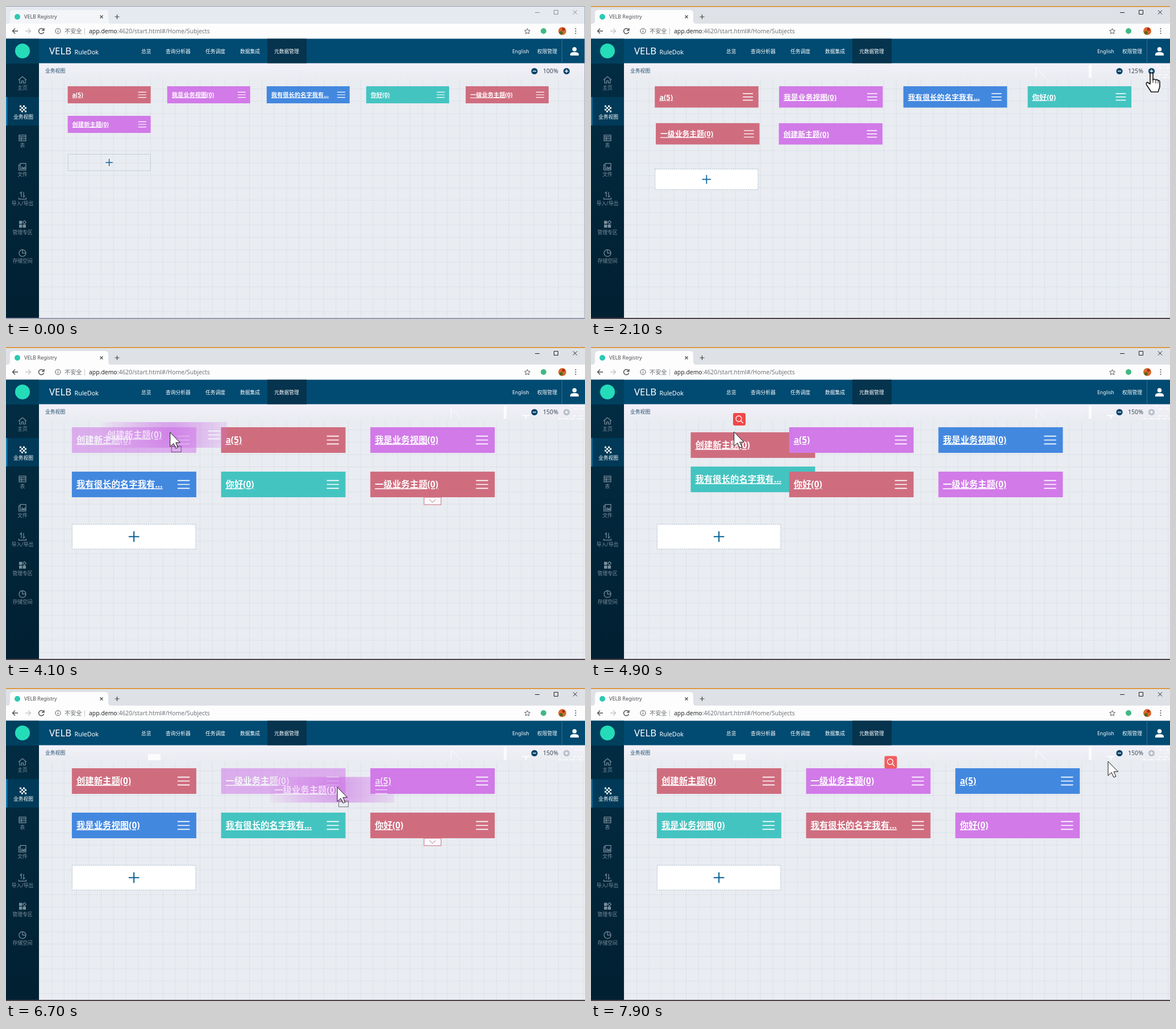
An HTML page that plays this animation: 1019 by 550 pixels, repeating every 8000 ms.

```html
<!DOCTYPE html>
<html lang="zh">
<head>
<meta charset="utf-8">
<style>
html, body { margin: 0; width: 100%; height: 100%; overflow: hidden; background: #e9ecf1 }
svg { display: block; width: 1019px; height: 550px; font-family: "Noto Sans", "Noto Sans CJK SC", sans-serif }
text { white-space: pre }
.title { font-weight: 700; fill: #fff; text-decoration: underline }
</style>
</head>
<body>
<svg id="stage" viewBox="0 0 1019 550"></svg>
<script>
const LOOP = 8000, FLIP = 500;
const NAMES = ['a(5)', '我是业务视图(0)', '我有很长的名字我有...', '你好(0)', '一级业务主题(0)', '创建新主题(0)'];
const COLORS = ['#cf6d7f', '#d17ae8', '#4388df', '#44c4c1', '#cf6d7f', '#d17ae8'];

// start time, zoom, card order by slot
const SCENES = [
  [0, 1, [0, 1, 2, 3, 4, 5]],
  [1635, 1.25, [0, 1, 2, 3, 4, 5]],
  [2605, 1.5, [0, 1, 2, 3, 4, 5]],
  [4600, 1.5, [5, 0, 1, 2, 3, 4]],
  [7100, 1.5, [5, 4, 0, 1, 2, 3]]
];
// start, reorder, release and drop times, dragged card, order while dragging
const DRAGS = [
  [3800, 3950, 4300, 4600, 5, SCENES[3][2]],
  [6400, 6650, 6900, 7100, 4, SCENES[4][2]]
];
// appearance time, left, top
const BADGES = [[4600, 250, 116], [7100, 516.5, 119.5]];

const ARROW = 0, HAND = 1, BEAM = 2, DRAG = 3;
const PATH = [
  [250, 1000, 172, ARROW], [600, 783, 107, ARROW], [1000, 960, 84, ARROW],
  [1300, 986, 117, HAND], [2700, 986, 117, HAND], [3000, 969, 118, BEAM],
  [3080, 958, 124, ARROW], [3500, 768, 230, ARROW], [3600, 756, 237, ARROW],
  [3800, 760, 237, DRAG], [3950, 480, 172, DRAG], [4100, 289, 150, DRAG],
  [4300, 251, 149, DRAG], [4600, 251, 149, HAND], [4900, 251, 149, ARROW],
  [5400, 600, 245, ARROW], [6000, 773, 191, ARROW], [6150, 788, 215, ARROW],
  [6300, 760, 237, ARROW], [6400, 760, 237, DRAG], [6650, 600, 180, DRAG],
  [6900, 517, 152, DRAG], [7100, 517, 152, HAND], [7300, 517, 152, ARROW],
  [7600, 760, 235, ARROW], [7900, 910, 129, ARROW], [8000, 910, 129, ARROW]
];

const mix = (a, b, p) => a + (b - a) * p;
const rect = (x, y, w, h, fill, extra = '') =>
  `<rect x="${x}" y="${y}" width="${w}" height="${h}" fill="${fill}" ${extra}/>`;
const circle = (x, y, r, fill, extra = '') =>
  `<circle cx="${x}" cy="${y}" r="${r}" fill="${fill}" ${extra}/>`;
const text = (x, y, size, fill, s, extra = '') =>
  `<text x="${x}" y="${y}" font-size="${size}" fill="${fill}" ${extra}>${s}</text>`;
const line = (d, color, width = 1, extra = '') =>
  `<path d="${d}" fill="none" stroke="${color}" stroke-width="${width}" ${extra}/>`;
const at = (x, y, body, extra = '') => `<g transform="translate(${x} ${y})" ${extra}>${body}</g>`;

// CSS "ease" curve
function ease(p) {
  if (p <= 0) return 0;
  if (p >= 1) return 1;
  let lo = 0, hi = 1, u;
  for (let i = 0; i < 20; i++) {
    u = (lo + hi) / 2;
    const x = .75 * u * (1 - u) ** 2 + .75 * u * u * (1 - u) + u ** 3;
    if (x < p) lo = u; else hi = u;
  }
  return .3 * u * (1 - u) ** 2 + 3 * u * u * (1 - u) + u ** 3;
}

function slotPos(slot, zoom) {
  const cols = zoom == 1 ? 5 : zoom == 1.25 ? 4 : 3;
  return [94 + 14.6 * zoom + slot % cols * 175.1 * zoom, 141 + Math.floor(slot / cols) * 52 * zoom];
}

function pointer(t) {
  const i = PATH.findLastIndex(k => k[0] <= t);
  if (i < 0) return null;
  const a = PATH[i], b = PATH[i + 1] || a;
  const p = b === a ? 0 : (t - a[0]) / (b[0] - a[0]);
  return { x: mix(a[1], b[1], p), y: mix(a[2], b[2], p), kind: a[3] };
}

function drawPointer({ x, y, kind }) {
  const ink = 'fill="#fff" stroke="#111" stroke-linejoin="round"';
  const arrow = `<path d="M0 0V25L6 19.5L10 28L14 26.3L10 18H17.5Z" ${ink}/>`;
  const shapes = [
    arrow,
    `<path d="M-2 2Q0-1 3 2V13Q5 10 8 13Q10 11 12 14Q15 13 15 17V25L12 34H0L-8 22Q-10 18-7 17L-2 20Z" ${ink} stroke-width="1.6"/>`
      + line('M3 12V18M8 13V19M12 14V19', '#111'),
    line('M-6-11H-2L0-9L2-11H6M0-9V9M-6 11H-2L0 9L2 11H6', '#111', 2.2),
    arrow + rect(2.5, 24.5, 17, 10, 'none', 'stroke="#333" stroke-dasharray="2 1"')
  ];
  return at(x, y, shapes[kind]);
}

function cardBody(name, zoom, fill) {
  const w = 146 * zoom, h = 30 * zoom, mid = h / 2, gap = 4.6 * zoom;
  const bars = [-gap, 0, gap].map(d => `M${w - 22 * zoom} ${mid + d}h${14.2 * zoom}`).join('');
  return rect(0, 0, w, h, fill)
    + text(8, mid + 3.9 * zoom, 10.27 * zoom, '#fff', name, 'class="title"')
    + line(bars, '#fff', 1.1 * zoom);
}

const handle = color => rect(94.5, 45, 30, 13, '#f8fafc', `stroke="${color}"`)
  + line('M104 49l5.5 5l5.5-5', color);

function drawCards(t, cursor) {
  const n = SCENES.findLastIndex(s => s[0] <= t);
  const [start, zoom, order] = SCENES[n];
  const drag = DRAGS.find(d => t >= d[0] && t < d[3]);
  const shown = drag && t >= drag[1] ? drag[5] : order;
  const p = ease((t - start) / FLIP);
  let out = '';

  shown.forEach((id, slot) => {
    let [x, y] = slotPos(slot, zoom);
    if (n && p < 1) {
      const [, oldZoom, oldOrder] = SCENES[n - 1];
      const [ox, oy] = slotPos(oldOrder.indexOf(id), oldZoom);
      x = mix(ox, x, p);
      y = mix(oy, y, p);
    }
    const color = COLORS[order.indexOf(id)];
    const over = cursor && cursor.x > x && cursor.x < x + 219 && cursor.y > y && cursor.y < y + 58;
    const open = zoom == 1.5 && (drag ? slot == 5 : over);
    const held = drag && drag[4] == id;
    out += at(x, y, cardBody(NAMES[id], zoom, color), held ? 'opacity=".55"' : '');
    if (open) out += at(x, y, handle(color));
  });

  const bx = 94 + 14.6 * zoom + .5, by = Math.round(158 + 102 * zoom) + .5;
  const w = 145 * zoom, h = 29 * zoom, arm = 6.2 * zoom;
  out += rect(bx, by, w, h, zoom > 1 ? '#fff' : 'none', 'stroke="#a9bccb" stroke-dasharray="2.2 1.5"')
    + line(`M${bx + w / 2 - arm} ${by + h / 2}h${2 * arm}m${-arm} ${-arm}v${2 * arm}`, '#0b6296', 1.4 * zoom);

  if (drag && t < drag[2]) {
    out += at(cursor.x - 119, cursor.y - 18, cardBody(NAMES[drag[4]], zoom, 'url(#fade)'), 'opacity=".6"');
  }
  return out;
}

function drawZoom(zoom) {
  const off = zoom == 1.5;
  return circle(930, 114.5, 5.6, '#07436a') + line('M927 114.5h6', '#fff', 1.4)
    + text(945, 118.3, 10.6, '#3c4b58', zoom * 100 + '%')
    + circle(986.5, 114.5, 5.6, off ? '#b6bdc6' : '#07436a') + line('M983.5 114.5h6m-3-3v6', '#fff', 1.4);
}

function drawBadges(t) {
  return BADGES.map(([t0, x, y]) => {
    const age = t - t0;
    if (age < 0 || age > 1650) return '';
    const alpha = 1 - Math.max(0, age - 200) * .00027;
    return at(x, y, rect(0, 0, 22, 22, '#f04444', 'rx="3"')
      + circle(10, 10, 5, 'none', 'stroke="#fff" stroke-width="1.3"')
      + line('M13.7 13.7l4 4', '#fff', 1.3), `opacity="${alpha}"`);
  }).join('');
}

// pale traces left on the toolbar strip
function drawTraces(t) {
  let out = '';
  if (t > 1100) {
    out += line('M783.5 108V126M783.5 108L800 126', '#fff') + rect(876, 103, 5, 23, '#fff', 'opacity=".8"')
      + line('M994 104h24M972 126h46M1000 109h18M998 121h20', '#fff', 2, 'stroke-dasharray="5 3 2 2" opacity=".75"');
  }
  if (t > 3100) out += rect(908, 119.5, 13, 2, '#fff') + rect(914, 121, 2, 5, '#fff');
  if (t > 6250) out += rect(250, 116, 22, 11, '#fff', 'opacity=".85"');
  return out;
}

function drawChrome(active) {
  const ink = active ? '#222' : '#858a92';
  return rect(0, 0, 1019, 31, active ? '#dee1e6' : '#e5e9f0')
    + rect(0, 0, 1019, active ? 1.6 : 1, active ? '#dc8a24' : '#8e96a8')
    + `<path d="M2 31Q7 31 7 26V13Q7 7 13 7H174Q180 7 180 13V26Q180 31 185 31Z" fill="${active ? '#fdfdfd' : '#f3f5f8'}"/>`
    + circle(20, 19, 5, '#2cc9b4')
    + text(32, 22.4, 9, '#4a4d52', 'VELB Registry')
    + line('M165.5 16.5l5 5m0-5l-5 5M191.5 19h8m-4-4v8', '#444', 1.2)
    + line('M931 11.5h8M964.5 7.5h7v7h-7zM998 7.5l7 7m0-7l-7 7', ink)
    + rect(0, 548, 1019, 2, active ? '#4c4049' : '#969bb2')
    + (active ? '' : rect(1018, 0, 1, 550, '#a3a9bb'));
}

function sidebar() {
  const items = [
    ['主页', 'M22 130l7-6l7 6M24 129v6.5h3.5v-4h3v4H34V129'],
    ['业务视图', ''],
    ['表', 'M23 125.5h12v10H23zM23 128.5h12M23 132h12M27 128.5v7'],
    ['文件', 'M25 124.5h10v9H25zM25 127h-2.5v9H35v-3M27 131h2l1 1.5h2l1-1.5h2'],
    ['导入/导出', 'M27 133v-9l-2.5 2.5M31 124v9l2.5-2.5M22.5 134v2.5h13V134'],
    ['管理专区', ''],
    ['存储空间', 'M35 130a6 6 0 1 1-6-6v6zM29 124a6 6 0 0 1 6 6']
  ];
  const dots = [[24, 124], [30, 124], [27, 127], [33, 127], [24, 130], [30, 130], [27, 133], [33, 133]];
  return items.map(([label, d], i) => {
    const color = i == 1 ? '#fff' : '#7b8f9c';
    let icon = line(d, color, 1.2);
    if (i == 1) icon = dots.map(([x, y]) => rect(x, y, 3, 3, color)).join('');
    if (i == 5) icon = rect(23, 124, 5.4, 5.4, color) + rect(23, 130.6, 5.4, 5.4, color)
      + rect(29.6, 130.6, 5.4, 5.4, color) + line('M32.4 123.6l3 3l-3 3l-3-3z', color, 1.2);
    return at(0, i * 50.7, icon
      + text(i == 1 ? 30.5 : 29, 147, 8.8, color, label, `text-anchor="middle" ${i == 1 ? 'font-weight="500"' : ''}`));
  }).join('');
}

function backdrop() {
  const nav = [[238, '总览'], [281, '查询分析器'], [351, '任务调度'], [412, '数据集成'], [472, '元数据管理'],
    [891, 'English'], [935, '权限管理']];
  return `<defs>
    <pattern id="grid" x="80" y="145" width="21.75" height="21.75" patternUnits="userSpaceOnUse">
      <path d="M0 .5H21.75M.5 0V21.75" stroke="#d9dfe7" stroke-width=".9" stroke-dasharray="3 .8"/></pattern>
    <linearGradient id="strip" x2="0" y2="1"><stop stop-color="#f3f0f9"/><stop offset="1" stop-color="#e9ecf1"/></linearGradient>
    <linearGradient id="side" x2="0" y2="1"><stop stop-color="#022c42"/><stop offset="1" stop-color="#012032"/></linearGradient>
    <radialGradient id="fade" gradientUnits="userSpaceOnUse" cx="119" cy="18" r="125">
      <stop stop-color="#c766e4"/><stop offset=".4" stop-color="#d17ae8" stop-opacity=".75"/>
      <stop offset="1" stop-color="#d17ae8" stop-opacity=".08"/></radialGradient>
  </defs>`
    + rect(58, 100, 961, 450, '#e9ecf1') + rect(58, 130, 961, 420, 'url(#grid)')
    + rect(58, 100, 961, 30, 'url(#strip)')
    + text(69, 117.3, 8.8, '#24506f', '业务视图')
    // address bar
    + rect(0, 31, 1019, 27, '#fdfdfd')
    + line('M21 44H11.5m4.5-4.5l-4.5 4.5l4.5 4.5', '#4c4f54', 1.4)
    + line('M34 44h9.5m-4.5-4.5l4.5 4.5l-4.5 4.5', '#c4c6ca', 1.4)
    + line('M66 41.5a4.6 4.6 0 1 0 .6 4M67 39v3.8h-4', '#4c4f54', 1.4)
    + circle(91.5, 44, 4.6, 'none', 'stroke="#55585d"') + line('M91.5 43.5v3M91.5 41v1.2', '#55585d', 1.2)
    + text(103, 47.8, 10.2, '#63676c', '不安全') + line('M138.5 39v11', '#c2c5c9')
    + text(146, 47.8, 10.4, '#707479', '<tspan fill="#25282c">app.demo</tspan>:4620/start.html#/Home/Subjects')
    + line('M917.5 39.5l1.4 3.1l3.5.4l-2.6 2.3l.8 3.4l-3.1-1.7l-3.1 1.7l.8-3.4l-2.6-2.3l3.5-.4z', '#55585d')
    + circle(946, 44, 5, '#41b883')
    + circle(979, 44, 7, '#d9682a') + circle(977, 47, 3, '#4f6a24') + circle(981, 41, 2.5, '#a52c18')
    + [40, 44, 48].map(y => circle(1002.5, y, 1.1, '#55585d')).join('')
    // page header
    + rect(0, 57.5, 1019, 43, '#014a71') + rect(0, 57.5, 58, 43.5, '#00405f')
    + rect(460, 57.5, 69, 43, '#06334d') + rect(978, 57.5, 1, 43, '#3b7292')
    + circle(29, 79, 13, '#25dcb8')
    + text(76, 85.4, 16.8, '#fff', 'VELB') + text(120.5, 85.4, 10.8, '#fff', 'RuleDok')
    + nav.map(([x, s]) => text(x, 83.2, 8.75, '#fff', s, 'font-weight="500"')).join('')
    + circle(1000.5, 76, 3.8, '#fff') + '<path d="M993 87v-2q0-4 7.5-4t7.5 4v2z" fill="#fff"/>'
    // side menu
    + rect(0, 101, 58, 449, 'url(#side)') + rect(0, 160, 58, 50, '#003a58') + rect(0, 160, 2.5, 50, '#0a78b4')
    + sidebar();
}

const stage = document.getElementById('stage');
stage.innerHTML = backdrop() + '<g id="live"></g>';
const live = document.getElementById('live');
const begin = performance.now();

function tick() {
  const t = (performance.now() - begin) % LOOP;
  const cursor = pointer(t);
  const zoom = SCENES.findLast(s => s[0] <= t)[1];
  live.innerHTML = drawChrome(t >= 1550) + drawTraces(t) + drawZoom(zoom)
    + drawCards(t, cursor) + drawBadges(t) + (cursor ? drawPointer(cursor) : '');
  requestAnimationFrame(tick);
}
tick();
</script>
</body>
</html>
```
